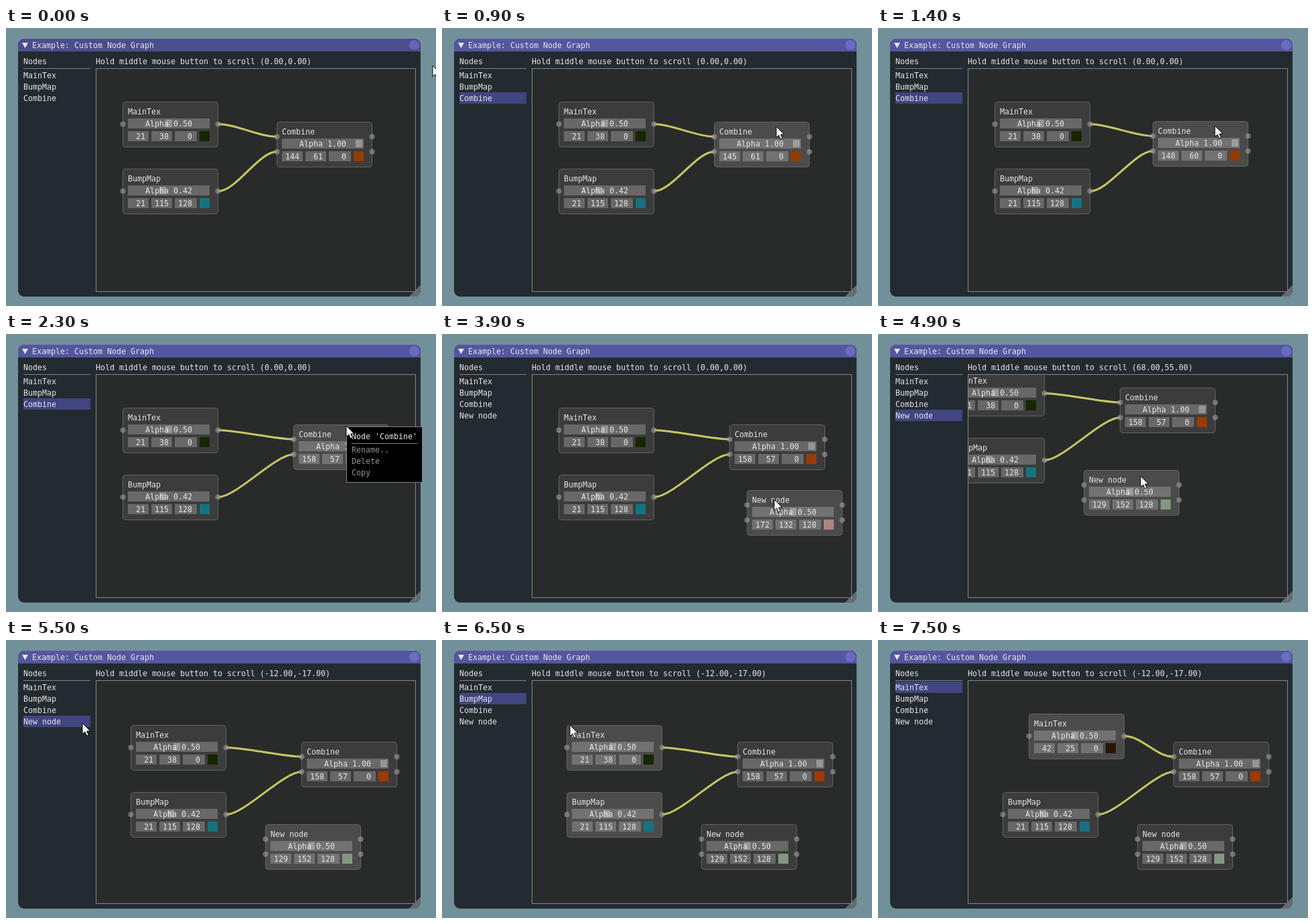
These frames come from a looping animation (642x415 px, 8500 ms). An HTML page with a canvas:

```html
<!DOCTYPE html>
<html lang="en">
<head>
<meta charset="utf-8">
<title>Custom Node Graph</title>
<style>
  html, body { margin: 0; width: 100%; height: 100%; overflow: hidden; background: #72909a; }
  canvas { display: block; width: 642px; height: 415px; }
</style>
</head>
<body>
<canvas width="642" height="415"></canvas>
<script>
const ctx = document.querySelector('canvas').getContext('2d');
const LOOP = 8500, STEP = 100;
const LEFT = 134, TOP = 60, NODE_W = 143, NODE_H = 68, ROW_H = 17, LIST_TOP = 62;
const TEXT = '#e6e6e6', DIM = '#929292', BORDER = '#858585', HEADER = '#414580';
const FOCUS = 500, NODE_MENU = 2300, CANVAS_MENU = 3000, ADD_NODE = 3500;

const progress = (t, from, to) => Math.min(1, Math.max(0, (t - from) / (to - from)));
const smooth = k => k * k * (3 - 2 * k);
const mix = (a, b, k) => a.map((v, i) => v + (b[i] - v) * k);

// Dragging Combine: a slow pull, then a swing up and back to its resting place.
function dragCombine(t) {
  const slow = mix([270, 80], [276, 79], progress(t, 600, 1400));
  const k = progress(t, 1400, 2000);
  const swing = Math.sin(Math.PI * Math.min(1, k * 1.5));
  const [x, y] = mix(slow, [295, 75], k);
  return [x + 27 * swing, y - 40 * swing];
}

const mainTex = { name: 'MainTex', alpha: .5, blue: 0, slots: 1,
  place: t => mix([40, 50], [79, 33], progress(t, 6700, 7000)) };
const bumpMap = { name: 'BumpMap', alpha: .42, blue: 128, slots: 1, place: () => [40, 150] };
const combine = { name: 'Combine', alpha: 1, blue: 0, slots: 2, place: dragCombine };
const newNode = { name: 'New node', alpha: .5, blue: 128, slots: 2,
  place: t => mix([321, 173], [241, 198], progress(t, 3900, 4100)) };

const selections = [[0, null], [FOCUS, combine], [CANVAS_MENU, null],
  [4000, newNode], [6200, bumpMap], [6800, mainTex]];

const scrollAt = t =>
  mix(mix([0, 0], [68, 55], progress(t, 4400, 4900)), [-12, -17], progress(t, 4900, 5200)).map(Math.round);

// Places the cursor can head for; a grip keeps following whatever it holds.
const point = (x, y) => () => [x, y];
const grip = (node, dx, dy) => () => [node.x + dx, node.y + dy];
const row = (i, x) => point(x, LIST_TOP + ROW_H * i + 11);
const canvasGrip = scroll => [460 - scroll[0], 267 - scroll[1]];

const moves = [
  [0, 500, grip(combine, 93, 7)],
  [2000, 2100, point(508, 137)],
  [2300, 2500, point(540, 185)],
  [2600, CANVAS_MENU, point(455, 233)],
  [3000, ADD_NODE, point(472, 247)],
  [ADD_NODE, 3900, grip(newNode, 41, 14)],
  [4100, 4400, canvasGrip],
  [5200, 5500, row(3, 114)],
  [5500, 5700, row(2, 95)],
  [5800, 6000, row(1, 92)],
  [6200, 6700, grip(mainTex, 59, 20)],
  [7100, 7500, point(660, 30)]
];
const cursorAt = (t, scroll) => moves.reduce((pos, [from, to, target]) =>
  t > from ? mix(pos, target(scroll), smooth(progress(t, from, to))) : pos, [637, 56]).map(Math.round);

function fill(x, y, w, h, color) {
  ctx.fillStyle = color;
  ctx.fillRect(x, y, w, h);
}

function text(str, x, y, color = TEXT) {
  ctx.fillStyle = color;
  ctx.fillText(str, x, y);
}

function disc(x, y, r, color) {
  ctx.fillStyle = color;
  ctx.beginPath();
  ctx.arc(x, y, r, 0, 7);
  ctx.fill();
}

function polygon(points, color) {
  ctx.beginPath();
  points.forEach(p => ctx.lineTo(...p));
  ctx.closePath();
  ctx.fillStyle = color;
  ctx.fill();
}

function outline(x, y, w, h, color) {
  ctx.strokeStyle = color;
  ctx.lineWidth = 1;
  ctx.strokeRect(x + .5, y + .5, w - 1, h - 1);
}

function drawWindow(focused) {
  fill(0, 0, 642, 415, '#72909a');
  ctx.save();
  ctx.beginPath();
  ctx.roundRect(18, 16, 601, 385, 9);
  ctx.clip();
  fill(18, 16, 601, 385, '#232b31');
  fill(18, 16, 601, 19, focused ? '#5456a0' : '#4c4e8c');
  polygon([[619, 383.5], [619, 401], [601.5, 401]], '#656b6f');
  ctx.restore();
  polygon([[24, 22], [33, 22], [28.5, 30]], TEXT);
  text('Example: Custom Node Graph', 39, 30);
  disc(609.5, 25.5, 7.5, focused ? '#6a6bc3' : '#6264b8');
}

function drawList(nodes, lit) {
  text('Nodes', 26, 54);
  fill(26, 60, 100, 1, '#7c8584');
  nodes.forEach((node, i) => {
    const y = LIST_TOP + ROW_H * i;
    if (lit.includes(node)) fill(26, y, 100, ROW_H, HEADER);
    text(node.name, 26, y + 13);
  });
}

const slotY = (node, i) => node.y + NODE_H * (i + 1) / (node.slots + 1) - .5;

function drawLink(from, slot) {
  const x1 = from.x + NODE_W, y1 = slotY(from, 0), x2 = combine.x, y2 = slotY(combine, slot);
  const pull = 80 / 3;
  ctx.beginPath();
  ctx.moveTo(x1, y1);
  ctx.bezierCurveTo(x1 + pull, y1, x2 - pull, y2, x2, y2);
  ctx.strokeStyle = '#c8c864';
  ctx.lineWidth = 3;
  ctx.stroke();
}

function drawNode(node, bright) {
  const { x, y } = node, frame = 'rgba(204,204,204,.3)';
  ctx.beginPath();
  ctx.roundRect(x + .5, y + .5, NODE_W - 1, NODE_H - 1, 4);
  ctx.fillStyle = bright ? '#4b4b4b' : '#3c3c3c';
  ctx.fill();
  ctx.strokeStyle = '#646464';
  ctx.lineWidth = 1;
  ctx.stroke();
  text(node.name, x + 8, y + 19);

  fill(x + 8, y + 25, 122, 15, frame);
  fill(x + 10 + Math.round(108 * node.alpha), y + 27, 10, 11, 'rgba(255,255,255,.3)');
  text('Alpha ' + node.alpha.toFixed(2), x + 34, y + 37);

  // The color follows the node's place on the canvas.
  const rgb = [Math.round(255 * node.gx / 477), Math.round(255 * node.gy / 333), node.blue];
  rgb.forEach((value, i) => {
    const left = x + 8 + 35 * i;
    fill(left, y + 44, i < 2 ? 31 : 33, 15, frame);
    text(String(value).padStart(3), left + 5, y + 56);
  });
  fill(x + 115, y + 44, 15, 15, `rgb(${rgb})`);

  for (let i = 0; i < node.slots; i++)
    for (const side of [0, NODE_W - 1])
      disc(x + side + .5, slotY(node, i), 4, 'rgba(150,150,150,.65)');
}

function drawPopup(x, y, w, h) {
  fill(x, y, w, h, '#000');
  outline(x, y, w, h, BORDER);
}

function drawNodeMenu() {
  drawPopup(508, 138, 114, 84);
  text("Node 'Combine'", 516, 156.5);
  fill(516, 163, 98, 1, BORDER);
  ['Rename..', 'Delete', 'Copy'].forEach((item, i) => text(item, 516, 177 + ROW_H * i, DIM));
}

function drawCanvasMenu(hovered) {
  drawPopup(455, 234, 72, 46);
  if (hovered) fill(459, 240, 64, ROW_H, HEADER);
  text('Add', 463, 252);
  text('Paste', 463, 252 + ROW_H, DIM);
}

function drawCursor(x, y) {
  ctx.save();
  ctx.translate(x, y);
  polygon([[0, 0], [0, 16.5], [3.8, 13], [6.5, 19], [9.3, 17.8], [6.7, 12], [11.8, 12]], '#fff');
  ctx.strokeStyle = '#000';
  ctx.lineWidth = 1;
  ctx.stroke();
  ctx.restore();
}

function draw(t) {
  const scroll = scrollAt(t);
  const nodes = [mainTex, bumpMap, combine, newNode];
  for (const node of nodes) {
    [node.gx, node.gy] = node.place(t).map(Math.round);
    node.x = LEFT + node.gx - scroll[0];
    node.y = TOP + node.gy - scroll[1];
  }
  if (t < ADD_NODE) nodes.pop();

  const [cx, cy] = cursorAt(t, scroll);
  const nodeMenu = t >= NODE_MENU && t < CANVAS_MENU, canvasMenu = t >= CANVAS_MENU && t < ADD_NODE;
  const free = !nodeMenu && !canvasMenu;
  const selected = selections.filter(([start]) => start <= t).pop()[1];
  const inList = free && cx >= 26 && cx < 126;
  const listHover = inList ? nodes[Math.floor((cy - LIST_TOP) / ROW_H)] : undefined;
  const sceneHover = free && cx > LEFT && nodes.find(({ x, y }) =>
    cx >= x && cx < x + NODE_W && cy >= y && cy < y + NODE_H);

  ctx.font = '11.63px "DejaVu Sans Mono", monospace';
  drawWindow(t >= FOCUS);
  drawList(nodes, [selected, listHover]);
  text(`Hold middle mouse button to scroll (${scroll.map(v => v.toFixed(2))})`, LEFT, 54);

  fill(LEFT, TOP, 478, 334, '#292b2a');
  ctx.save();
  ctx.beginPath();
  ctx.rect(LEFT + 1, TOP + 1, 476, 332);
  ctx.clip();
  drawLink(mainTex, 0);
  drawLink(bumpMap, 1);
  for (const node of nodes)
    drawNode(node, node === sceneHover || node === (listHover || selected));
  ctx.restore();
  outline(LEFT, TOP, 478, 334, '#7f8a88');

  if (nodeMenu) drawNodeMenu();
  if (canvasMenu) drawCanvasMenu(cy > 240);
  drawCursor(cx, cy);
}

function tick() {
  draw(Math.floor(performance.now() % LOOP / STEP) * STEP);
  requestAnimationFrame(tick);
}
tick();
</script>
</body>
</html>
```
